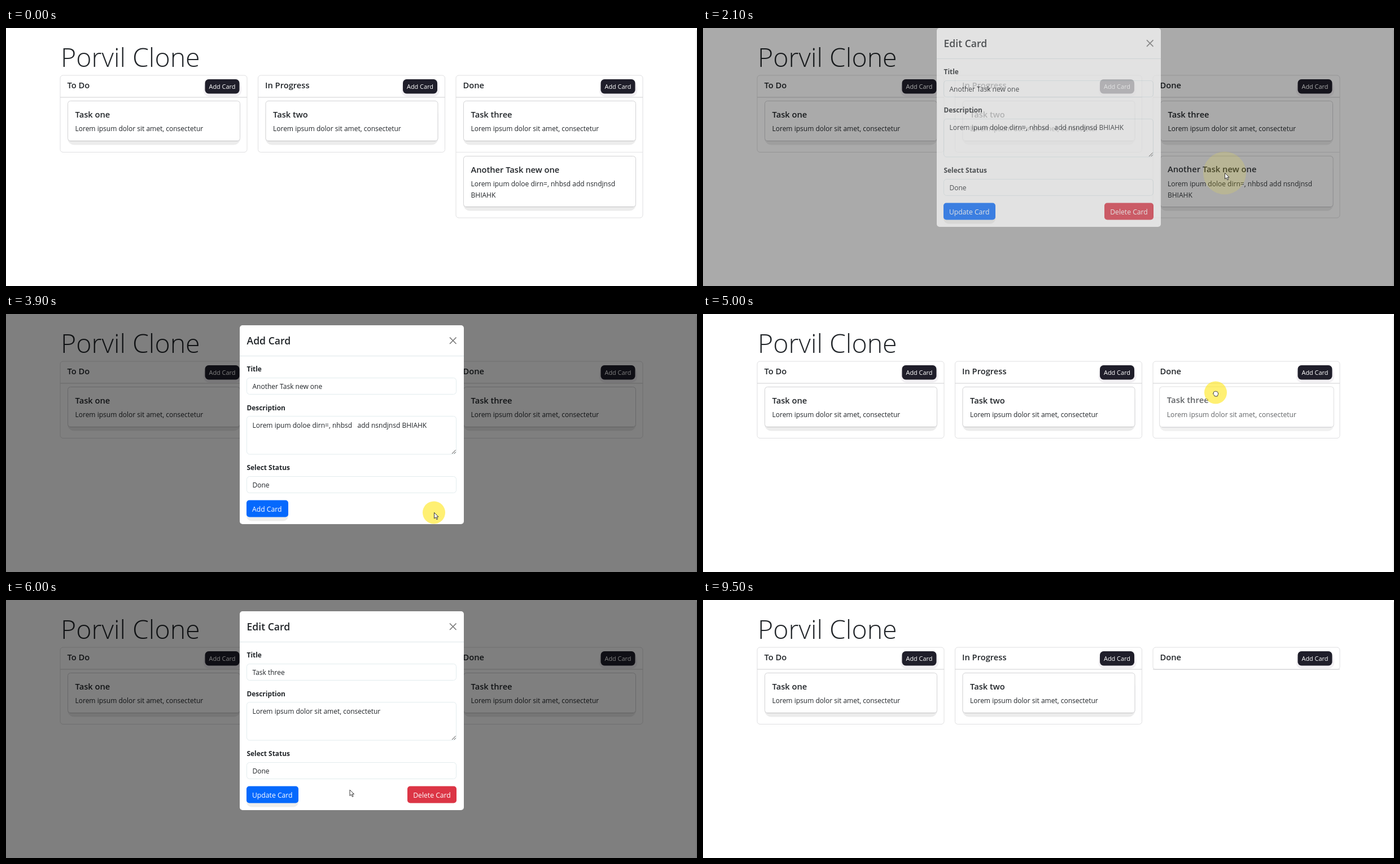
An HTML page that plays this animation: 1224 by 458 pixels, repeating every 9700 ms.

```html
<!DOCTYPE html>
<html lang="en">
<head>
<meta charset="utf-8">
<title>Porvil Clone</title>
<style>
html, body { margin: 0; width: 100%; height: 100%; overflow: hidden; background: #fff; }
svg { display: block; width: 1224px; height: 458px; }
text { font-family: "Open Sans", "Noto Sans", sans-serif; fill: #212529; white-space: pre; }
</style>
</head>
<body>
<svg id="stage" viewBox="0 0 1224 458"></svg>
<script>
const LOREM = "Lorem ipsum dolor sit amet, consectetur";

const text = (x, y, s, size = 12, weight = 400, more = "") =>
  `<text x="${x}" y="${y}" font-size="${size}" font-weight="${weight}" ${more}>${s}</text>`;
const rect = (x, y, w, h, r, fill, more = "") =>
  `<rect x="${x}" y="${y}" width="${w}" height="${h}" rx="${r}" fill="${fill}" ${more}/>`;
const frame = (x, y, w, h, stroke, more = "") =>
  rect(x, y, w, h, 5, "#fff", `stroke="${stroke}" ${more}`);

function card(x, y, h, title, lines, id) {
  return `<g id="${id}">` +
    rect(x - .5, y + 12, 306, h - 5, 12, "#ececec") +
    frame(x, y, 305, h, "#d2d2d4") +
    `<path d="M${x + 4} ${y + h}h297" stroke="#c2c2c4"/>` +
    text(x + 13, y + 29, title, 14.7, 600) +
    lines.map((s, i) => text(x + 13, y + 53.5 + i * 19.5, s)).join("") + "</g>";
}

function column(x, title, id) {
  return frame(x, 84, 331, 136.5, "#dfdfe1", `id="${id}"`) +
    `<path d="M${x} 123h331" stroke="#cfcfd1"/>` +
    text(x + 12.5, 106.5, title, 14.7, 600) +
    rect(x + 254, 96, 67, 26, 10, "#f2f0f3") +
    rect(x + 256.5, 91, 61, 25.5, 6.5, "#1f1e2a") +
    text(x + 287, 107.5, "Add Card", 10.9, 400, 'text-anchor="middle" style="fill:#fff"');
}

const label = (y, s) => text(426.5, y, s, 11.9, 700);
const field = (y, h) => frame(426.5, y, 371, h, "#e2ecee");
const white = 'style="fill:#fff"';

const modal = rect(414, 20, 397, 353, 5, "#fff") +
  text(426.5, 54, "", 17.6, 600, 'id="heading"') +
  `<path d="M414 74.5h397" stroke="#dee7ea"/>
   <path d="M786 41.5l11.5 11.5m0 -11.5l-11.5 11.5" stroke="#777" stroke-width="1.6"/>` +
  label(102, "Title") + field(113.5, 29) + text(436.5, 133, "", 12, 400, 'id="name"') +
  label(170.5, "Description") + field(181.5, 67.5) + text(436.5, 201.5, "", 12, 400, 'id="desc"') +
  `<path d="M790 248l6.500 -6.500m-3 6.500l3 -3" stroke="#444"/>` +
  label(277, "Select Status") + field(288.5, 29) + text(436.5, 308, "Done") +
  rect(426, 338, 92, 29.5, 9, "#eeeeec", 'id="glow"') +
  rect(426, 330.5, 92, 30, 5, "#0569fd", 'id="save"') +
  text(436, 350.8, "", 12.2, 500, `id="saveText" ${white}`) +
  `<g id="remove">${rect(711, 330.5, 87, 30, 5, "#dc3545", 'id="removeBox"')}
   ${text(754.5, 350.8, "Delete Card", 12.2, 500, `text-anchor="middle" ${white}`)}</g>`;

stage.innerHTML = rect(0, 0, 1224, 458, 0, "#fff") +
  rect(1222, 4, 2, 454, 0, "#ededed") +
  text(97, 68.5, "Porvil Clone", 46.5, 300) +
  column(96, "To Do", "todo") + column(446.5, "In Progress", "doing") + column(797, "Done", "done") +
  `<path id="divider" d="M797 220.500h331" stroke="#e4e4e6"/>` +
  card(109.5, 129.5, 71, "Task one", [LOREM], "one") +
  card(460, 129.5, 71, "Task two", [LOREM], "two") +
  card(810.5, 129.5, 71, "Task three", [LOREM], "three") +
  card(810.5, 227.5, 90, "Another Task new one",
    ["Lorem ipum doloe dirn=, nhbsd add nsndjnsd", "BHIAHK"], "four") +
  rect(0, 0, 1224, 458, 0, "#000", 'id="shade"') +
  `<g id="modal">${modal}</g>
  <circle id="ripple" fill="#ffe828"/>
  <g id="cursor" fill="#fff" stroke="#222" stroke-width=".9" stroke-linejoin="round">
    <path id="arrow" d="M.5 .5v10.500l2.500 -2.300l1.900 4.100l1.700 -.8l-1.800 -3.900h3.300z"/>
    <path id="hand" d="M-3 4.500c-2 -2 -2 -3 -.5 -2.500c-.5 -3 1 -4 2.200 -3c.8 -1.300 2 -1.200 2.600 0c1.300 -.8 2.300 0 2.200 1.200c1.400 0 1.200 3 .5 4.600l-1 2.200h-4.500z"/>
  </g>`;

const $ = id => document.getElementById(id);
const set = (id, attrs) => { for (const k in attrs) $(id).setAttribute(k, attrs[k]); };
const show = (id, on) => { $(id).style.display = on ? "" : "none"; };
const put = (id, s) => { if ($(id).textContent !== s) $(id).textContent = s; };
const ramp = (t, a, b) => Math.min(1, Math.max(0, (t - a) / (b - a)));

// time, x, y
const path = [
  [200, 1000, 402], [300, 1000, 396], [400, 1000, 396], [1000, 924, 257], [2400, 924, 257],
  [2700, 802, 308], [2800, 802, 308], [2900, 785, 327], [3300, 758, 355], [3500, 758, 355],
  [3600, 756, 359], [3700, 758, 352], [4300, 758, 352], [4700, 908, 139], [5500, 908, 139],
  [5900, 633, 343], [6100, 584, 330], [6300, 584, 330], [6900, 750, 340], [8000, 750, 340],
  [8100, 646, 376]
];
// press, release, end of fade
const clicks = [[1600, 1800, 2200], [3900, 3920, 4100], [5000, 5250, 5650], [7700, 7720, 7900]];
const edits = [
  { open: 2000, close: 3900, name: "Another Task new one",
    desc: "Lorem ipum doloe dirn=, nhbsd   add nsndjnsd BHIAHK" },
  { open: 5300, close: 7700, name: "Task three", desc: LOREM }
];

function cursorAt(t) {
  const i = path.findIndex(p => p[0] >= t);
  if (i < 1) return path[0].slice(1);
  const [a, b] = [path[i - 1], path[i]], k = ramp(t, a[0], b[0]);
  return [a[1] + (b[1] - a[1]) * k, a[2] + (b[2] - a[2]) * k];
}

function pressCard(id, cy, k) {
  const s = 1 + .012 * k;
  set(id, { opacity: 1 - .3 * k, transform: `translate(963 ${cy}) scale(${s}) translate(-963 ${-cy})` });
}

function drawModal(t, overDelete) {
  const e = edits.find(e => t >= e.open && t < e.close + 200);
  show("modal", e);
  show("shade", e);
  if (!e) return;
  const closing = t >= e.close;
  const fade = closing ? 1 - ramp(t, e.close, e.close + 150) : ramp(t, e.open, e.open + 150);
  const slide = closing ? ramp(t, e.close, e.close + 300) ** 1.7
    : (1 - ramp(t, e.open, e.open + 300)) ** 1.7;
  const dim = closing ? 1 - ramp(t, e.close + 50, e.close + 200) : fade;
  set("shade", { opacity: dim / 2 });
  set("modal", { opacity: fade, transform: `translate(0 ${-40 * slide})` });
  put("heading", closing ? "Add Card" : "Edit Card");
  put("saveText", closing ? "Add Card" : "Update Card");
  put("name", e.name);
  put("desc", e.desc);
  for (const id of ["save", "glow"]) set(id, { width: closing ? 74 : 92 });
  show("remove", !closing);
  set("removeBox", { fill: overDelete ? "#bb2d3b" : "#dc3545" });
}

function draw(t) {
  const [x, y] = cursorAt(t);
  const editing = edits.some(e => t >= e.open && t < e.close);
  const overDelete = editing && x > 711 && x < 798 && y > 330 && y < 361;
  const overCard = (t >= 1000 && t < 2000) || (t >= 4700 && t < 5300);

  show("four", t < 3900);
  show("divider", t < 3900);
  show("three", t < 7700);
  set("done", { height: t < 3900 ? 253 : t < 7700 ? 136.5 : 39.5 });
  pressCard("four", 272, ramp(t, 1550, 1600) - ramp(t, 1900, 2200));
  pressCard("three", 165, ramp(t, 4950, 5000) - ramp(t, 5300, 5600));
  drawModal(t, overDelete);

  const c = clicks.find(c => t >= c[0] && t < c[2]);
  show("ripple", c);
  if (c) {
    const k = ramp(t, c[1], c[2]);
    set("ripple", { cx: x, cy: y + .5, r: 20 + 24 * k, opacity: .65 * (1 - k) });
  }

  show("cursor", t >= 200 && t < 8200);
  set("cursor", { transform: `translate(${x} ${y})` });
  show("hand", overCard || overDelete);
  show("arrow", !overCard && !overDelete);
}

const start = performance.now();
function tick() {
  const t = (performance.now() - start) % 9700;
  draw(Math.floor(t / 100) * 100);
  requestAnimationFrame(tick);
}
tick();
</script>
</body>
</html>
```
